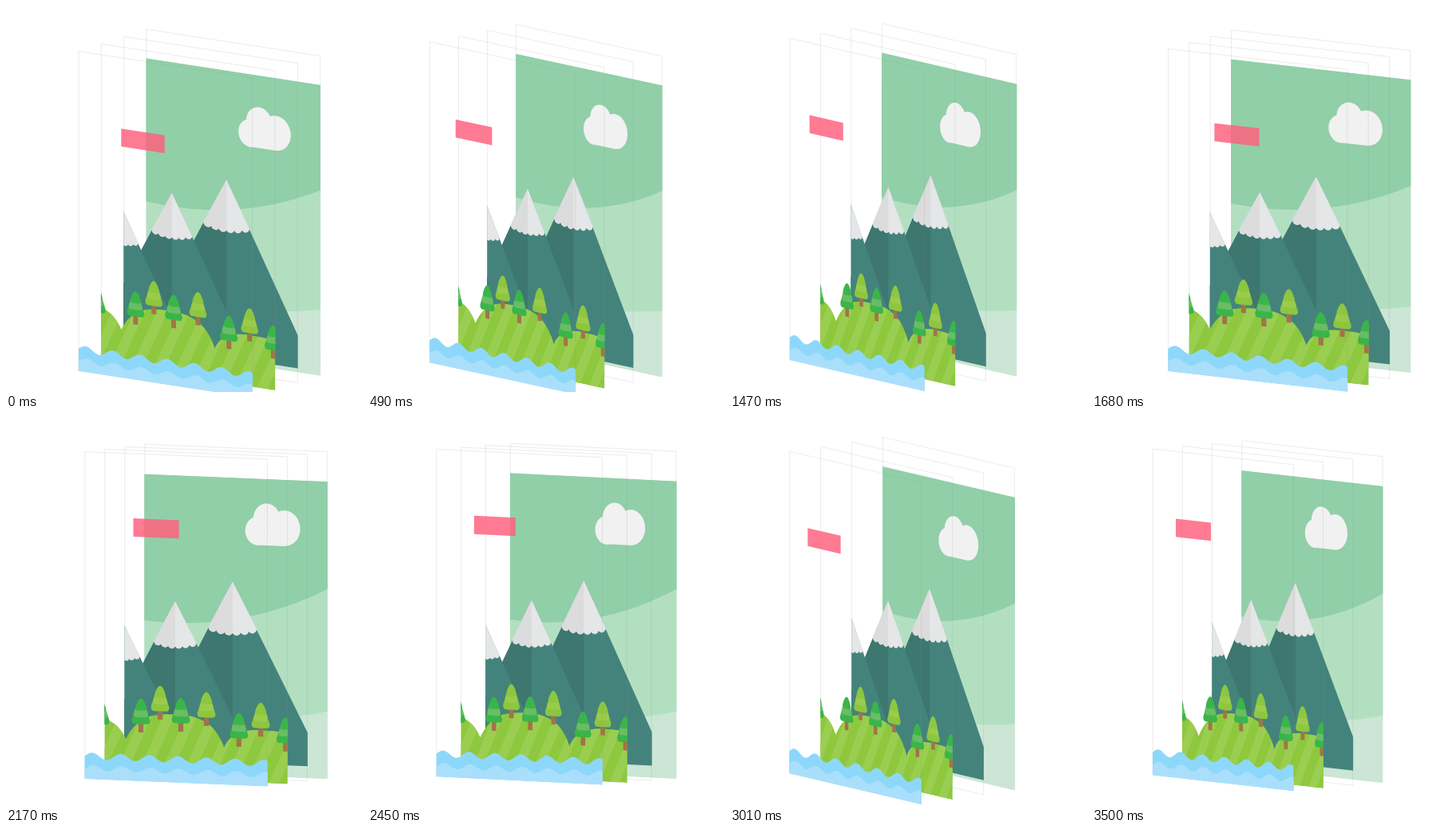
Recreate the animation shown at these times as an HTML page. Size 446x483 px, loop 3.57 s.

```html
<!DOCTYPE html>
<html lang="en">
<head>
<meta charset="utf-8">
<title>Layered landscape</title>
<style>
  html, body { margin: 0; width: 100%; height: 100%; overflow: hidden; background: #fff; }
  svg { display: block; width: 446px; height: 483px; }
</style>
</head>
<body>
<svg id="stage" viewBox="0 0 446 483" xmlns="http://www.w3.org/2000/svg"></svg>
<script>
const W = 265, H = 411, GAP = 50, LOOP = 3570, STEP = 70;
const PIVOT = { x: 313.1, y: 236.4 };

// time (ms), turn (deg), tilt (deg); eased between rows
const POSES = [
  [0, 34.5, 12.9], [560, 46.7, 11.9], [770, 49.3, 11.6], [840, 49.3, 11.6],
  [980, 52.5, 11.1], [1400, 52.5, 11.1], [1750, 29.6, 10.6],
  [1960, 28.5, 6.7], [2030, 28.5, 6.7], [2170, 30, 4.1], [2730, 46.2, 3.1],
  [3010, 51.3, 10.8], [3220, 51.3, 10.8], [3500, 48.1, 5.8]
];

const path = (d, fill) => `<path d="${d}" fill="${fill}"/>`;
const rect = (x, y, w, h, fill) =>
  `<rect x="${x}" y="${y}" width="${w}" height="${h}" fill="${fill}"/>`;
const circle = (x, y, r, fill) => `<circle cx="${x}" cy="${y}" r="${r}" fill="${fill}"/>`;
const at = (x, y, art, scale = 1) =>
  `<g transform="translate(${x} ${y}) scale(${scale})">${art}</g>`;

function sky() {
  return `<g clip-path="url(#skyBox)">${rect(0, 38, W, H - 38, '#cbe6d5')}
    ${circle(100, -482, 825, '#b3dfc1')}${circle(40, -307, 530, '#91cfa8')}</g>`;
}

// Snow from the left edge to bump number `end` of six
function snow(end, fill) {
  let d = 'M0 0';
  for (let i = 0; i <= end; i++) {
    const u = i / 3 - 1;
    d += (i ? 'A6.8 6.8 0 0 0 ' : 'L') + `${35 * u} ${65 - 6 * u * u}`;
  }
  return path(d + 'Z', fill);
}

function mountain(x, y, size) {
  const base = 392 - y, half = base / 1.715;
  return at(x, y, path(`M0 0L${half} ${base}H${-half}Z`, '#44837b') +
    path(`M0 0V${base}H${-half}Z`, '#3d776f') +
    at(0, 0, snow(6, '#e4e6e7') + snow(3, '#dcdcdd'), size));
}

function cloud() {
  const c = '#f1f1f1';
  return circle(192.5, 99.5, 17.8, c) + circle(206, 84, 19.5, c) +
    circle(232, 94.5, 22.3, c) + rect(192, 92, 40, 25, c);
}

function mountains() {
  return mountain(156.5, 163.7, 1) + mountain(73.5, 191.3, .88) +
    mountain(-1, 223.5, .67) + cloud();
}

// A leaf tier with bulging sides
function tier(y, w, h, fill) {
  const low = y + h, side = y + h * .78;
  return path(`M0 ${y}C${w * .45} ${y} ${w * .85} ${y + h * .5} ${w} ${side}` +
    `Q${w} ${low} ${w * .65} ${low}H${-w * .65}Q${-w} ${low} ${-w} ${side}` +
    `C${-w * .85} ${y + h * .5} ${-w * .45} ${y} 0 ${y}Z`, fill);
}

function tree(x, y, olive) {
  const [main, mid] = olive ? ['#8dc63f', '#9bcb4b'] : ['#3ab54a', '#69bd64'];
  return at(x, y, rect(-3.6, 27, 7.2, 15.5, '#a1744a') +
    tier(9, 13.2, 23, main) + tier(4, 10.4, 19.5, mid) + tier(0, 8.2, 15, main));
}

function hills() {
  let stripes = '';
  for (let x = -48; x < W; x += 32) stripes += `M${x} ${H + 10}l56 -110`;
  const spots = [
    [-6, 314], [52.7, 311.5], [80.5, 294.5], [110.5, 308.5],
    [147.5, 300], [194.5, 324.5], [226, 310.5], [262, 328]
  ];
  return `<g clip-path="url(#hillShape)">${rect(0, 300, W, H - 300, '#8dc83e')}
    <path d="${stripes}" stroke="#9ace51" stroke-width="14"/></g>` +
    spots.map(([x, y], i) => tree(x, y, i && i % 2 === 0)).join('');
}

function wave(crest, level, amp, fill) {
  let d = `M0 ${H}`;
  for (let x = 0; x <= W; x += 2.5) {
    const y = level - amp * Math.cos((x - crest) / 41.4 * 2 * Math.PI);
    d += `L${x} ${y.toFixed(2)}`;
  }
  return path(d + `V${H}Z`, fill);
}

const water = () => wave(11, 382, 4.2, '#8dd8fa') + wave(13, 397, 3.5, '#aadffb');
const label = () => `<g opacity=".83">${rect(99.5, 77.5, 66, 23, '#ff5f7d')}</g>`;

const sheet = art => `<rect x=".5" y=".5" width="${W - 1}" height="${H - 1}"
  fill="none" stroke="#909090" stroke-opacity=".2"/><g clip-path="url(#sheetBox)">${art}</g>`;

const hillLine = 'M0 340C12 340 25 351 31 363C43 342 60 330 93 330' +
  'C132 328 160 335 173 369C181 352 200 345 225 345C245 345 258 346 265 348';
const art = [sheet(sky()), sheet(mountains()), sheet(hills()), sheet(water()), label()];

const stage = document.getElementById('stage');
stage.innerHTML = `<defs>
  <clipPath id="sheetBox"><rect width="${W}" height="${H}"/></clipPath>
  <clipPath id="skyBox"><rect y="38" width="${W}" height="${H - 38}"/></clipPath>
  <clipPath id="hillShape"><path d="${hillLine}V${H}H0Z"/></clipPath>
  </defs>` + art.map(a => `<g class="layer">${a}</g>`).join('');
const layers = [...stage.querySelectorAll('.layer')];

const ease = k => (1 - Math.cos(Math.PI * k)) / 2;

function pose(t) {
  const i = Math.max(1, POSES.findIndex(p => p[0] >= t));
  const [p, q] = [POSES[i - 1], POSES[i]];
  const k = ease((t - p[0]) / (q[0] - p[0]));
  return [1, 2].map(n => (p[n] + (q[n] - p[n]) * k) * Math.PI / 180);
}

function draw(now) {
  const t = Math.floor((now % LOOP) / STEP) * STEP;
  const [turn, tilt] = pose(t);
  const cb = Math.cos(turn), sb = Math.sin(turn);
  const ca = Math.cos(tilt), sa = Math.sin(tilt);
  layers.forEach((layer, i) => {
    const z = GAP * (i + 1);
    const x = PIVOT.x - W / 2 * cb - z * sb;
    const y = PIVOT.y - H / 2 * ca - W / 2 * sb * sa + z * cb * sa;
    layer.setAttribute('transform', `matrix(${cb} ${sb * sa} 0 ${ca} ${x} ${y})`);
  });
}

function tick() {
  draw(performance.now());
  requestAnimationFrame(tick);
}
tick();
</script>
</body>
</html>
```
